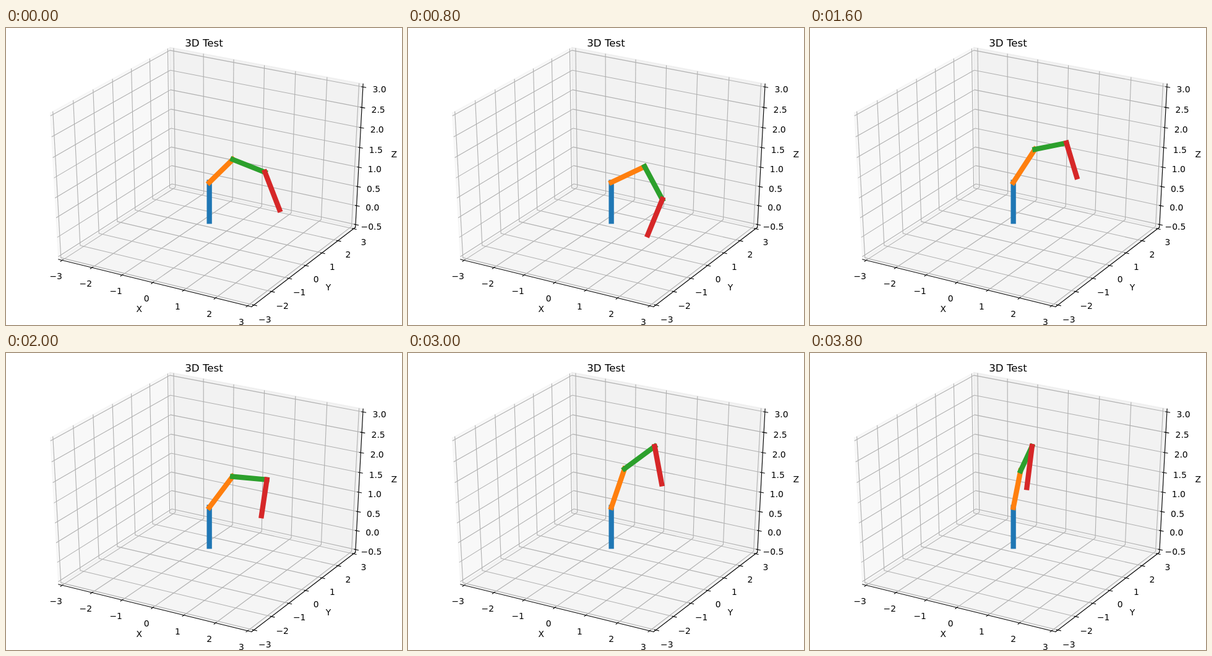
Recreate the animation shown at these times as an HTML page. Size 640 by 480 pixels, loop 4000 ms.

```html
<!DOCTYPE html>
<html lang="en">
<head>
<meta charset="utf-8">
<title>3D Test</title>
<style>
  html, body { margin: 0; width: 100%; height: 100%; overflow: hidden; background: #fff; }
  svg { display: block; width: 640px; height: 480px; }
  text { font: 13.889px "DejaVu Sans", sans-serif; text-anchor: middle; fill: #000; }
  .title { font-size: 16.667px; }
  .grid { stroke: #b0b0b0; stroke-width: 1.11; }
  .axis { stroke: #000; stroke-width: 1.11; stroke-linecap: square; }
  .tick { stroke: #000; stroke-width: 1.11; }
  .arm line { stroke-width: 8.33; stroke-linecap: square; }
</style>
</head>
<body>
<svg id="stage" viewBox="0 0 640 480"></svg>
<script>
const stage = document.getElementById('stage');

function add(tag, attrs, parent = stage) {
  const el = document.createElementNS('http://www.w3.org/2000/svg', tag);
  for (const k in attrs) el.setAttribute(k, attrs[k]);
  return parent.appendChild(el);
}

function setLine(el, [x1, y1], [x2, y2]) {
  el.setAttribute('x1', x1);
  el.setAttribute('y1', y1);
  el.setAttribute('x2', x2);
  el.setAttribute('y2', y2);
}

function write(str, x, y, cls = '') {
  add('text', { x, y, class: cls }).textContent = str;
}

// Perspective view of a unit cube centred on 0: azimuth -60, elevation 30, distance 10.
const C = Math.sqrt(3) / 2;
function project([x, y, z]) {
  const w = 10 - (C / 2 * x - 0.75 * y + 0.5 * z);
  const u = (C * x + 0.5 * y) / w;
  const v = (-0.25 * x + C / 2 * y + C * z) / w;
  return [(u + 0.095) / 0.185 * 640, 480 - (v + 0.095) / 0.185 * 480];
}

function line3(cls, a, b) {
  setLine(add('line', { class: cls }), project(a), project(b));
}

function withAt(p, i, value) {
  const q = p.slice();
  q[i] = value;
  return q;
}

const E = 0.5 + 1 / 48;         // half size of the box, with its margin
const far = [-E, E, -E];        // corner where the three panes meet
const axes = [
  { name: 'X', min: -3, max: 3, step: 1, digits: 0, edge: [0, -E, -E], tickDir: 1, out: -1 },
  { name: 'Y', min: -3, max: 3, step: 1, digits: 0, edge: [E, 0, -E], tickDir: 0, out: 1 },
  { name: 'Z', min: -0.5, max: 3, step: 0.5, digits: 1, edge: [E, E, 0], tickDir: 0, out: 1 }
];

function drawPane(i, tone) {
  const [j, k] = [(i + 1) % 3, (i + 2) % 3];
  const corners = [[-E, -E], [E, -E], [E, E], [-E, E]].map(([a, b]) =>
    project(withAt(withAt(far, j, a), k, b)));
  const color = `rgb(${tone},${tone},${tone})`;
  add('polygon', {
    points: corners.join(' '), fill: color, stroke: color,
    'stroke-width': 1.39, 'fill-opacity': 0.5, 'stroke-opacity': 0.5
  });
}

function drawAxis(a, i) {
  const pushOut = (p, d) => p.map((v, n) => n === i ? v : v + Math.sign(v) * d);
  const count = Math.round((a.max - a.min) / a.step);
  const spots = Array.from({ length: count + 1 }, (_, n) => n / count - 0.5);

  line3('axis', withAt(a.edge, i, -E), withAt(a.edge, i, E));

  for (const s of spots) {
    const p = withAt(far, i, s);
    for (const j of [(i + 1) % 3, (i + 2) % 3]) line3('grid', p, withAt(p, j, -far[j]));
  }

  spots.forEach((s, n) => {
    const p = withAt(a.edge, i, s);
    const base = p[a.tickDir];
    line3('tick', withAt(p, a.tickDir, base - a.out / 120),
                  withAt(p, a.tickDir, base + a.out / 60));
    const [x, y] = project(pushOut(p, 0.05704));
    const label = (a.min + n * a.step).toFixed(a.digits).replace('-', '\u2212');
    write(label, x, y + 11);
  });

  const [x, y] = project(pushOut(a.edge, 0.124));
  write(a.name, x, y + 5);
}

[242.25, 229.5, 235.9].forEach((tone, i) => drawPane(i, tone));
axes.forEach(drawAxis);
write('3D Test', 320, 30, 'title');

// Arm poses: step, then elbow, wrist and tip on screen.
const STEP = 200, STEPS = 20;
const base = project([0, 0, 1 / 7 - 0.5]);
const shoulder = project([0, 0, 3 / 7 - 0.5]);
const poses = [
  [0, 366.5, 212.5, 418.5, 233, 442, 293.6],
  [2, 374.5, 228, 416, 273.5, 418, 337],
  [4, 382.5, 224, 411, 277, 387.5, 334.3],
  [8, 363.5, 196, 414.5, 185.8, 431, 240.5],
  [12, 368.5, 203.5, 423.5, 225.5, 389.8, 276],
  [15, 350, 187, 398.7, 151, 410, 211.4],
  [19, 340.3, 190.5, 358.8, 151, 350.5, 217.3]
].map(([step, ...p]) => {
  let [px, py] = shoulder;
  const links = [];
  for (let i = 0; i < 6; i += 2) {
    const dx = p[i] - px, dy = p[i + 1] - py;
    links.push([Math.hypot(dx, dy), Math.atan2(dy, dx)]);
    [px, py] = [p[i], p[i + 1]];
  }
  return { step, links };
});

const arm = add('g', { class: 'arm' });
const bars = ['#1f77b4', '#ff7f0e', '#2ca02c', '#d62728'].map(stroke => add('line', { stroke }, arm));
setLine(bars[0], base, shoulder);

const mix = (a, b, f) => a + (b - a) * f;

function drawArm(step) {
  let n = 0;
  while (n < poses.length - 2 && step >= poses[n + 1].step) n++;
  const a = poses[n], b = poses[n + 1];
  const f = (step - a.step) / (b.step - a.step);
  let from = shoulder;
  a.links.forEach(([len, angle], i) => {
    const r = mix(len, b.links[i][0], f);
    const t = mix(angle, b.links[i][1], f);
    const to = [from[0] + r * Math.cos(t), from[1] + r * Math.sin(t)];
    setLine(bars[i + 1], from, to);
    from = to;
  });
}

function tick() {
  drawArm(Math.floor(performance.now() / STEP) % STEPS);
  requestAnimationFrame(tick);
}
tick();
</script>
</body>
</html>
```
